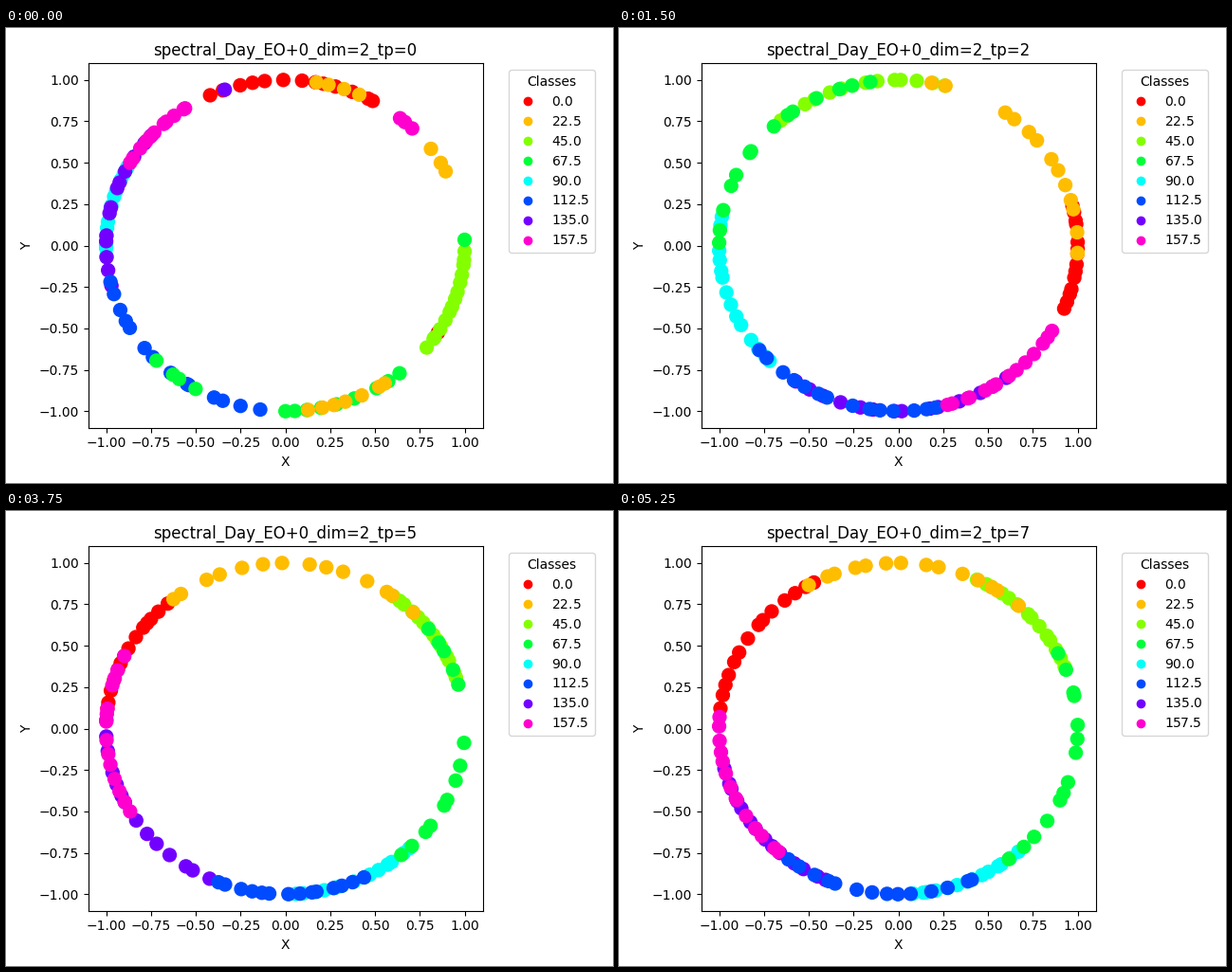
These frames come from a looping animation (640x480 px, 6 s). A matplotlib script:

```python
import numpy as np
import matplotlib.pyplot as plt
from matplotlib.animation import FuncAnimation

PER_CLASS = 14
CLASSES = np.arange(8) * 22.5
STACK = [0, 2, 4, 6, 5, 3, 7, 1]  # drawing order of the classes

# Arcs in degrees (start, end, start, end, ...) each class covers, 0.0 to 157.5.
ARCS = {
    0: [(115, 59, -26, -32), (80, 60, 36, 20, -56, -84), (-2, -38),
        (4, -1, -49, -91, -114, -136), (184, 150), (-98, -169),
        (194, 137, 112, 109), (150, 124, 55, 45)],
    1: [(57, -12), (6, -40), (-43, -109), (-101, -151),
        (-145, -205), (203, 113), (125, 68), (97, 64)],
    2: [(14, -23), (80, 74, 59, -5), (131, 75), (179, 99),
        (227, 170), (284, 219), (-53, -126), (-31, -75)],
    3: [(179, 142), (167, 134, 110, 84), (95, 61), (41, -26),
        (-8, -73), (-45, -100), (-88, -148), (-106, -173)],
    5: [(173, 131), (129, 44), (53, 18), (37, 14, -4, -51),
        (-45, -87), (-64, -113), (-115, -183), (-150, -206)],
    7: [(173, 117), (120, 47), (64, 22), (27, -52),
        (-48, -86), (-65, -128), (-114, -166), (-132, -184)],
}


def spread(knots, rng):
    """Nearly even angles along a class's arcs, skipping the gaps."""
    steps = np.abs(np.diff(knots)).astype(float)
    steps[1::2] = 0
    dist = np.concatenate([[0], np.cumsum(steps)])
    gap = dist[-1] / PER_CLASS
    along = np.linspace(0, dist[-1], PER_CLASS)
    along += rng.normal(0, 0.3 * gap, PER_CLASS)
    return np.interp(along, dist, knots)


def angles(tp):
    """Angles by class; time points without arcs lie between their neighbours."""
    if tp not in ARCS:
        return (angles(tp - 1) + angles(tp + 1)) / 2
    rng = np.random.default_rng(tp)
    return np.array([spread(knots, rng) for knots in ARCS[tp]])


def ring(tp):
    t = np.radians(angles(tp)[STACK].ravel())
    return np.column_stack([np.cos(t), np.sin(t)])


rings = [ring(tp) for tp in range(8)]
values = np.repeat(CLASSES[STACK], PER_CLASS)

fig, ax = plt.subplots(figsize=(6.4, 4.8), dpi=100)
dots = ax.scatter(*rings[0].T, c=values, s=100, cmap="hsv", vmin=0, vmax=180)
ax.set(xlim=(-1.1, 1.1), ylim=(-1.1, 1.1), xlabel="X", ylabel="Y")
title = ax.set_title("spectral_Day_EO+0_dim=2_tp=0")
ax.legend(*dots.legend_elements(), title="Classes",
          loc="upper left", bbox_to_anchor=(1.05, 1))
fig.tight_layout()


def update(tp):
    dots.set_offsets(rings[tp])
    title.set_text(f"spectral_Day_EO+0_dim=2_tp={tp}")
    return dots, title


anim = FuncAnimation(fig, update, frames=len(rings), interval=750,
                     repeat=True, repeat_delay=0)
plt.show()
```
